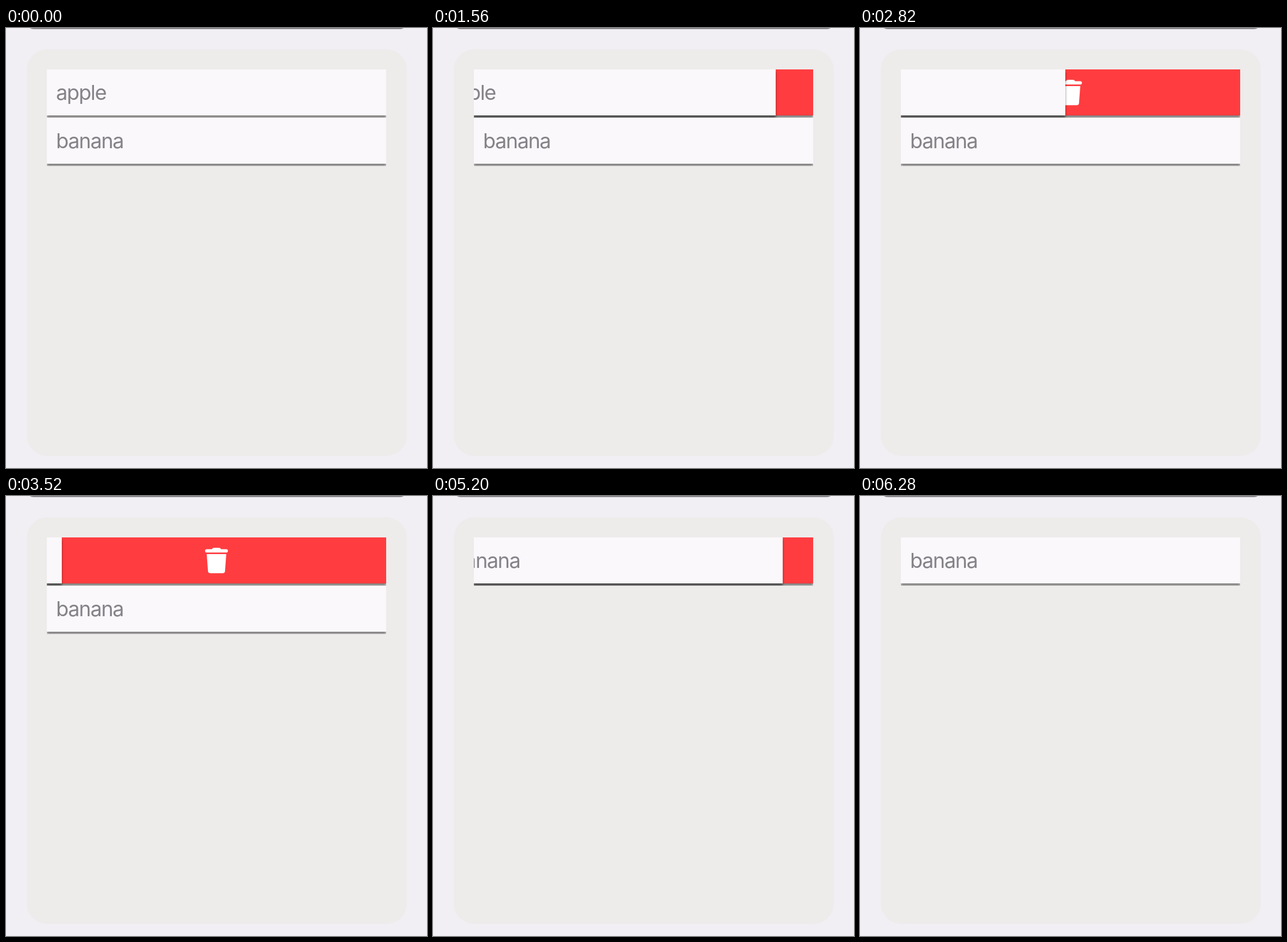
Animation of 732 by 765 pixels, one loop 6480 ms. Source, as an HTML page:

```html
<!DOCTYPE html>
<html lang="en">
<head>
<meta charset="utf-8">
<title>Swipe to delete</title>
<style>
  html, body { margin: 0; width: 100%; height: 100%; overflow: hidden; background: #f1eff3; }
  div, svg { position: absolute; box-sizing: border-box; }
  .field { left: 36px; top: -60px; width: 661px; height: 62px; border: 2px solid #8a878d; border-radius: 12px; }
  .panel { left: 36px; top: 37px; width: 661px; height: 707px; border-radius: 36px; background: #eeebeb; }
  .cell { left: 71px; width: 590px; height: 84px; overflow: hidden; }
  .row, .delete { width: 590px; height: 80px; box-shadow: 0 4px 4px rgba(0, 0, 0, .48); }
  .row {
    padding-left: 16px; background: #faf8fb; color: #858388;
    font: 36px/80px Inter, sans-serif; letter-spacing: -1.4px; white-space: nowrap;
  }
  .delete { background: #ff3d40; }
  .delete svg { left: 275px; top: 18px; fill: #fff; }
</style>
</head>
<body>
<div class="field"></div>
<div class="panel"></div>
<div class="cell" style="top:72px">
  <div class="delete" id="del">
    <svg width="40" height="45">
      <path d="M3 2.6H12Q13 0 15.5 0H24.5Q27 0 28 2.6H37A2.7 2.7 0 0 1 37 8.2H3A2.7 2.7 0 0 1 3 2.6Z"/>
      <path d="M3 11H37L34.8 40.5Q34.5 44.3 30.7 44.3H9.3Q5.5 44.3 5.2 40.5Z"/>
    </svg>
  </div>
  <div class="row" id="first"></div>
</div>
<div class="cell" id="second" style="top:156px"><div class="row">banana</div></div>
<script>
  const LOOP = 6480, WIDTH = 590;
  const DRAG_START = 1140, RELEASE = 3020, DELETED = 4500, CLOSE = 4620, CLOSED = 6280;
  const [del, first, second] = ['del', 'first', 'second'].map(id => document.getElementById(id));

  // Finger drag: [time, distance to the left]
  const drag = [
    [1140, 10], [1240, 10], [1700, 89], [1800, 89], [2120, 123],
    [2220, 123], [2400, 169], [2500, 169], [2820, 304]
  ];

  function dragAt(t) {
    const i = drag.findIndex(([time]) => time > t);
    if (i < 0) return drag[drag.length - 1][1];
    const [t0, x0] = drag[i - 1], [t1, x1] = drag[i];
    return x0 + (x1 - x0) * (t - t0) / (t1 - t0);
  }

  // Critically damped spring: share of the way still to go
  function spring(ms, rate) {
    const x = Math.max(0, ms) / 1000 * rate;
    return (1 + x) * Math.exp(-x);
  }

  function swipeAt(t) {
    if (t < DRAG_START || t >= CLOSED) return 0;
    if (t < RELEASE) return dragAt(t);
    if (t < DELETED) return WIDTH - (WIDTH - 304) * spring(t - RELEASE, 8);
    return WIDTH * spring(t - CLOSE, 6.93);
  }

  function draw(now) {
    const t = now % LOOP, swipe = swipeAt(t);
    first.textContent = t < DELETED ? 'apple' : 'banana';
    first.style.transform = `translateX(${-swipe}px)`;
    del.style.visibility = swipe ? 'visible' : 'hidden';
    second.style.visibility = t < DELETED ? 'visible' : 'hidden';
  }

  const start = performance.now();
  function tick() {
    draw(performance.now() - start);
    requestAnimationFrame(tick);
  }
  tick();
</script>
</body>
</html>
```
